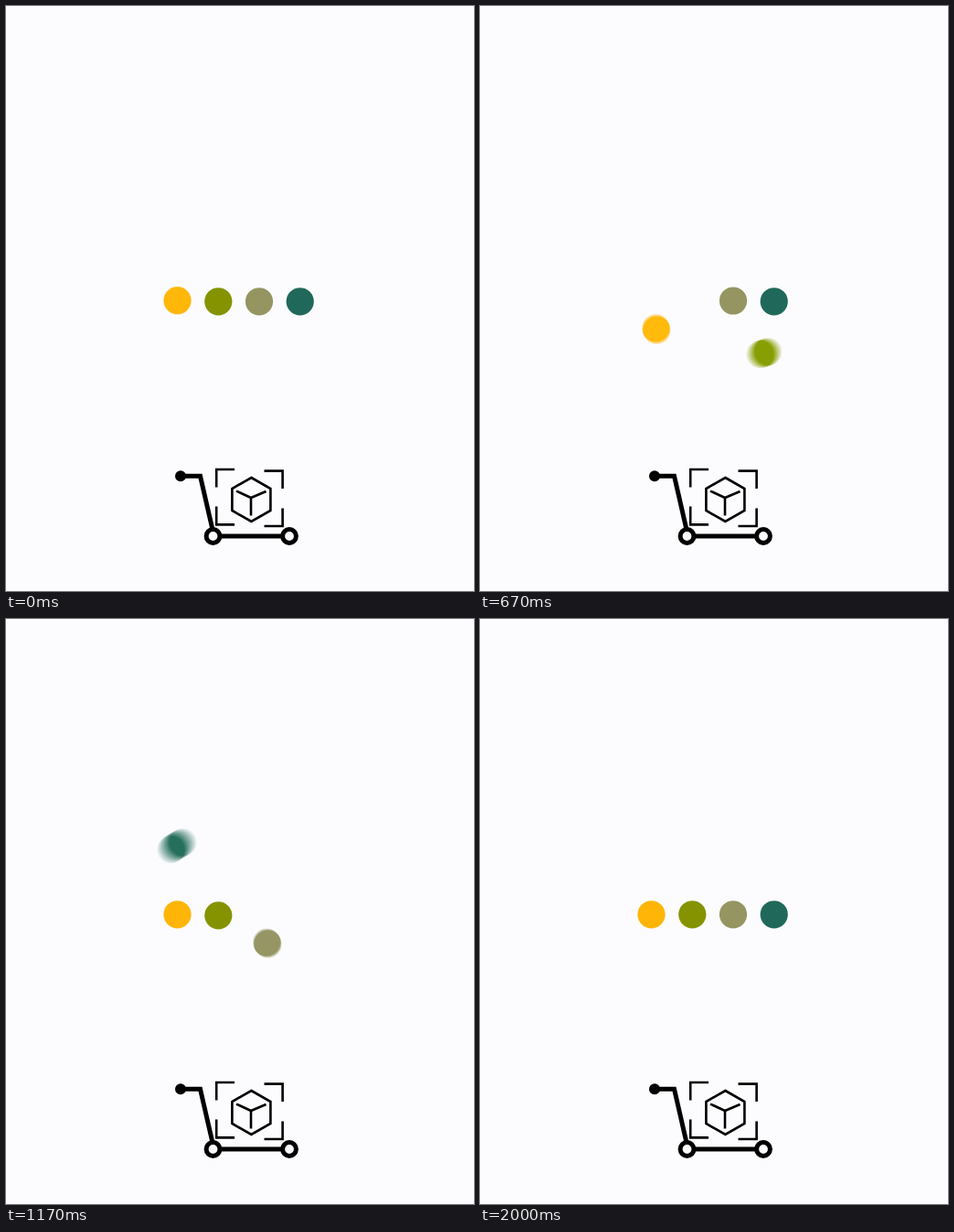
An HTML page that plays this animation: 512x640 px, repeating every 2.08 s.

```html
<!DOCTYPE html>
<html lang="en">
<head>
<meta charset="utf-8">
<title>Cart loader</title>
<style>
  html, body { margin: 0; width: 100%; height: 100%; overflow: hidden; background: #fcfcff; }
  svg { display: block; width: 512px; height: 640px; }
  .ball { isolation: isolate; }
  .ball circle { mix-blend-mode: plus-lighter; }
</style>
</head>
<body>
<svg viewBox="0 0 512 640">
  <rect width="512" height="640" fill="#fcfcff"/>
  <g id="cart" fill="none" stroke="#000">
    <g stroke-width="5">
      <path d="M191 514.3H212.5L226 573M235 580H301"/>
      <circle cx="226.5" cy="580" r="7.4"/>
      <circle cx="310" cy="580" r="7.4"/>
    </g>
    <circle cx="191" cy="514.3" r="6" fill="#000" stroke="none"/>
    <g stroke-width="2.6">
      <path d="M230.2 526.5V507H250M282.5 508.6H302.6V528M302.6 549.5V569H282.5M250 567.4H230.2V547.5"/>
      <path d="M268.4 516L289.4 528V552L268.4 564L247.4 552V528Z"/>
      <path d="M252 530.6L268 538L284.5 531M268 538V557.5"/>
    </g>
  </g>
  <g id="balls"></g>
</svg>
<script>
const LOOP = 2080;
const STEP = 250 / 3;
const SHUTTER = 15;
const BASELINE = 323.3;
const RADIUS = 15.1;
const MAX_COPIES = 24;
const SVG_NS = 'http://www.w3.org/2000/svg';

// A negative orbit puts the centre of the circle to the left of the ball.
const balls = [
  { color: '#ffb508', home: 187.5, orbit: 88,    start: 2050, duration: 953, ease: [0.42, 0.254] },
  { color: '#859300', home: 232.3, orbit: 59.6,  start: 337,  duration: 910, ease: [0.417, 0] },
  { color: '#959562', home: 277,   orbit: 60,    start: 638,  duration: 910, ease: [0.417, 0] },
  { color: '#20695a', home: 321.7, orbit: -88.5, start: 804,  duration: 965, ease: [0.41, 0.08] }
];

function make(name, parent, attributes) {
  const node = document.createElementNS(SVG_NS, name);
  for (const key in attributes) node.setAttribute(key, attributes[key]);
  return parent.appendChild(node);
}

// Cubic Bezier easing with control points (a, 0) and (b, 1).
function ease(x, [a, b]) {
  if (x <= 0) return 0;
  if (x >= 1) return 1;
  let low = 0, high = 1, s;
  for (let i = 0; i < 30; i++) {
    s = (low + high) / 2;
    const q = 1 - s;
    if (3 * a * s * q * q + 3 * b * s * s * q + s ** 3 < x) low = s;
    else high = s;
  }
  return s * s * (3 - 2 * s);
}

function angleAt(ball, time) {
  const elapsed = (time - ball.start + LOOP) % LOOP;
  return 2 * Math.PI * ease(elapsed / ball.duration, ball.ease);
}

// Motion blur is the average of evenly spaced copies along the arc.
function drawBall(ball, time) {
  const center = angleAt(ball, time);
  let sweep = angleAt(ball, time + SHUTTER / 2) - angleAt(ball, time - SHUTTER / 2);
  if (sweep < 0) sweep = 0;
  const length = sweep * Math.abs(ball.orbit);
  const count = length < 1 ? 1 : Math.min(MAX_COPIES, Math.ceil(length) + 1);
  ball.copies.forEach((copy, i) => {
    copy.style.display = i < count ? '' : 'none';
    if (i >= count) return;
    const angle = center + sweep * ((i + 0.5) / count - 0.5);
    copy.setAttribute('cx', ball.home + ball.orbit * (1 - Math.cos(angle)));
    copy.setAttribute('cy', BASELINE - ball.orbit * Math.sin(angle));
    copy.setAttribute('opacity', 1 / count);
  });
}

function render(ms) {
  const tick = Math.floor((ms % LOOP) / 10);
  const step = Math.ceil((tick + 0.5) * 10 / STEP) - 1;
  for (const ball of balls) drawBall(ball, step * STEP);
}

const layer = document.getElementById('balls');
for (const ball of balls) {
  const group = make('g', layer, { class: 'ball', fill: ball.color });
  ball.copies = Array.from({ length: MAX_COPIES }, () => make('circle', group, { r: RADIUS }));
}

const began = performance.now();
function loop() {
  render(performance.now() - began);
  requestAnimationFrame(loop);
}
loop();
</script>
</body>
</html>
```
